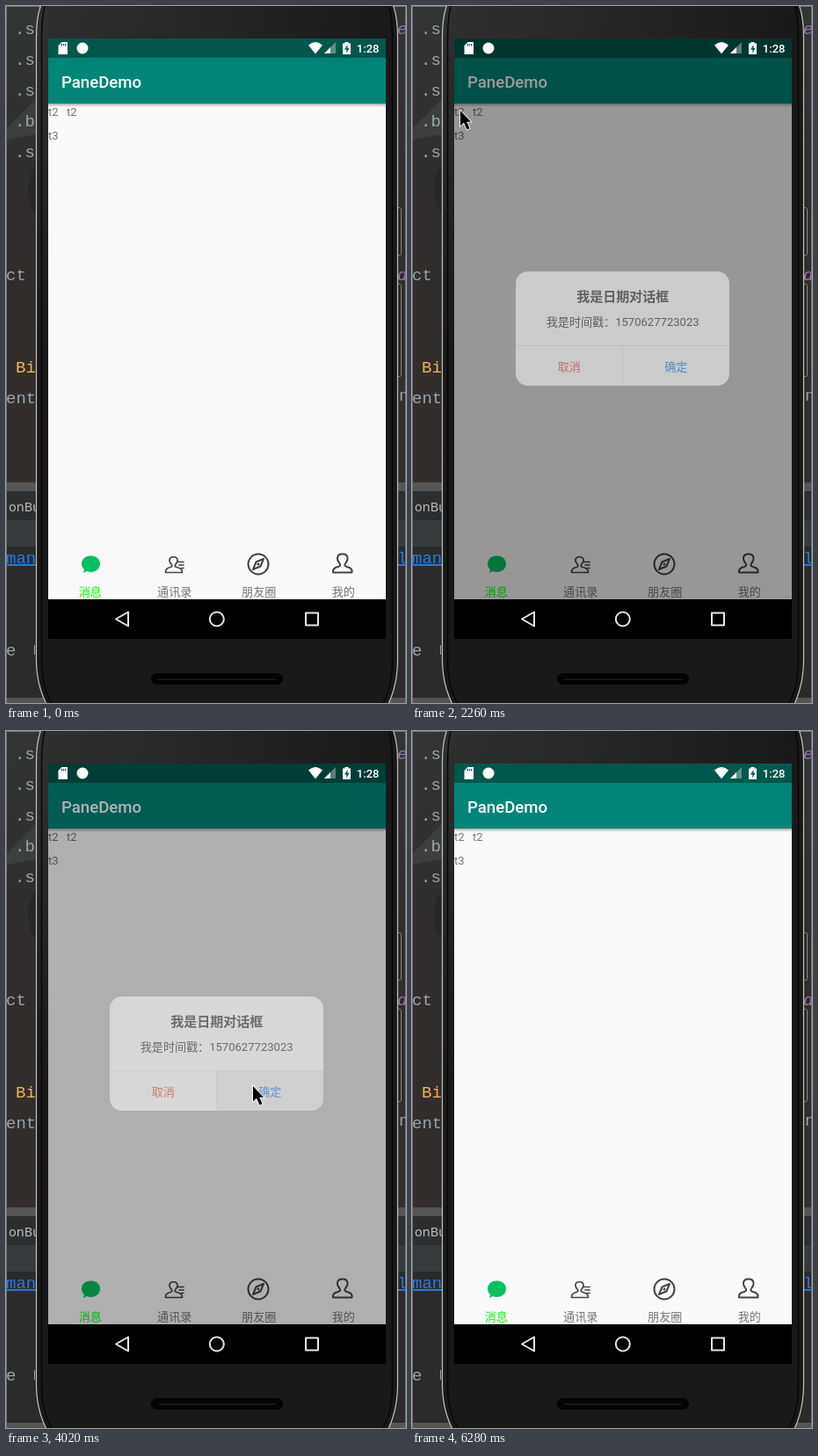
Write an HTML page that moves like this. It is 455 by 793 pixels and loops after 6.43 s.

```html
<!DOCTYPE html>
<html lang="zh-CN">
<head>
<meta charset="utf-8">
<style>
  html, body { margin: 0; width: 100%; height: 100%; overflow: hidden; background: #2b2b2b; }
  svg { display: block; width: 455px; height: 793px; font: 13.07px Roboto, "Noto Sans CJK SC", "Noto Sans CJK", sans-serif; }
  .code { font: 19px "Liberation Mono", monospace; fill: #98a5ae; }
  .link { fill: #287bde; text-decoration: underline; }
  .field { font-style: italic; fill: #9876aa; }
  .hint { font: 14.5px "Noto Sans", sans-serif; fill: #bbb; }
  .mid { text-anchor: middle; }
  .line { fill: none; stroke: #444; stroke-width: 2; stroke-linejoin: round; stroke-linecap: round; }
</style>
</head>
<body>
<svg viewBox="0 0 455 793">
  <defs>
    <linearGradient id="wall" x2="0" y2="1">
      <stop offset="0" stop-color="#333434"/>
      <stop offset=".3" stop-color="#303030"/>
      <stop offset=".42" stop-color="#302d2c"/>
      <stop offset="1" stop-color="#332e2c"/>
    </linearGradient>
    <radialGradient id="gloss" gradientUnits="userSpaceOnUse" cx="40" cy="0" r="400">
      <stop offset="0" stop-color="#303030"/>
      <stop offset="1" stop-color="#191919"/>
    </radialGradient>
    <linearGradient id="shadow" x2="0" y2="1">
      <stop offset="0" stop-opacity=".32"/>
      <stop offset="1" stop-opacity="0"/>
    </linearGradient>
    <clipPath id="card"><rect x="118" y="302" width="243" height="130" rx="14"/></clipPath>
  </defs>

  <!-- Editor behind the phone -->
  <rect width="455" height="542" fill="url(#wall)"/>
  <path d="M0 140L34 106V146L0 152Z" fill="#3d3f3f"/>
  <path d="M34 180Q24 195 25 212T34 235Z" fill="#272727"/>
  <rect y="542" width="455" height="10" fill="#555"/>
  <rect y="552" width="455" height="33" fill="#2d2e2f"/>
  <rect y="585" width="455" height="30" fill="#363b3e"/>
  <rect y="615" width="455" height="172" fill="#2b2b2b"/>
  <rect y="787" width="455" height="6" fill="#555"/>
  <path d="M.5 793V.5H454.500V793" fill="none" stroke="#77797a"/>
  <g class="code">
    <text x="10" y="32">.s</text>
    <text x="10" y="67">.s</text>
    <text x="10" y="102">.s</text>
    <text x="10" y="137">.b</text>
    <text x="10" y="172">.s</text>
    <text x="0" y="312">ct</text>
    <text x="11" y="417" style="fill:#f0b455">Bi</text>
    <text x="0" y="452">ent</text>
    <text x="0" y="634" class="link">man</text>
    <text x="0" y="739">e</text>
    <text x="445" y="32" class="field">e</text>
    <text x="445" y="312" class="field">d</text>
    <text x="447" y="449">n</text>
    <text x="445" y="634" class="link">l</text>
  </g>
  <text x="3" y="575" class="hint">onBu</text>
  <path d="M32.500 727V738" stroke="#98a5ae"/>

  <!-- Phone body -->
  <g fill="#262626" stroke="#8b8b8b">
    <rect x="444.500" y="229.500" width="5" height="54" rx="2"/>
    <rect x="444.500" y="316.500" width="5" height="105" rx="2"/>
  </g>
  <path d="M40 -2Q34.500 12 34.500 36V745Q35 774 47 796H434Q445 774 445.500 745V36Q445.500 12 440 -2Z" fill="url(#gloss)" stroke="#c4c4c4" stroke-width="1.200"/>
  <path d="M44 0Q40.500 14 40.500 40V745Q41 776 52 793M429 793Q439 776 439.500 745V40Q439.500 14 436 0" fill="none" stroke="#080808" stroke-width="1.500"/>
  <rect x="165" y="759" width="150" height="13" rx="6.500" fill="#030303"/>
  <path d="M174 766H306" stroke="#151515" stroke-width="2" stroke-linecap="round"/>

  <!-- App -->
  <rect x="48" y="37" width="384" height="22" fill="#00574b"/>
  <rect x="48" y="59" width="384" height="52" fill="#008577"/>
  <rect x="48" y="111" width="384" height="564" fill="#fafafa"/>
  <rect x="48" y="111" width="384" height="4" fill="url(#shadow)"/>
  <text x="63" y="92.500" font-size="18.600" font-weight="500" fill="#fff">PaneDemo</text>
  <g fill="#757575">
    <text x="48" y="125">t2</text>
    <text x="69" y="125">t2</text>
    <text x="48" y="152">t3</text>
    <g class="mid">
      <text x="95.700" y="671" fill="#0f0">消息</text>
      <text x="191.700" y="671">通讯录</text>
      <text x="287.700" y="671">朋友圈</text>
      <text x="383.700" y="671">我的</text>
    </g>
  </g>
  <path d="M96.500 625.500C103 625.500 107 629.500 107 634.500S103 644 96.500 644Q94 644 92 643L88 645 89 641Q86 638.500 86 634.500C86 629.500 90 625.500 96.500 625.500Z" fill="#05c160"/>
  <g class="line">
    <path stroke-width="1.700" d="M181.500 644.500Q181 640 187 638.500C189.500 638 189 636.500 188 635Q185.500 632 186 630.500C186 625.500 195 625.500 195 630.500Q195.500 632 193 635C192 636.500 191.500 638 194 638.500Q201 640 200.500 644.500ZM196 632.500H202M197 636H202M199.500 639.500H202"/>
    <circle cx="287" cy="635" r="11.500"/>
    <path d="M293 629L289.500 637.500 281 641 284.500 632.500Z"/>
    <path d="M372 644.500Q371 639.500 378 638C381 637 380.500 635.500 379 633.500Q376.500 630.500 377 628C377.500 622 388 622 388.500 628Q389 630.500 386.500 633.500C385 635.500 384.500 637 387.500 638Q394.500 639.500 393.500 644.500Z"/>
  </g>
  <circle cx="287" cy="635" r="1.500" fill="#444"/>

  <rect id="dim" x="48" y="37" width="384" height="638"/>

  <!-- System bars -->
  <g fill="#fff">
    <path d="M63.500 41H70V55H59.500V45Z"/>
    <circle cx="87" cy="48" r="6.500"/>
    <path d="M344 44.500Q352 37.500 360 44.500L352 54.500Z"/>
    <path d="M375 41V54H362Z" opacity=".35"/>
    <path d="M369 47V54H362Z"/>
    <path d="M385.500 41H389.500V42.500H392V55H383V42.500H385.500Z"/>
    <text x="424.500" y="53" text-anchor="end" font-weight="500">1:28</text>
  </g>
  <path d="M63.500 43V45.500M65.500 43V45.500M67.500 43V45.500" stroke="#00574b"/>
  <path d="M388.500 44L385 49.500H387.300V53.500L390.500 48H388.500Z" fill="#00574b"/>
  <rect x="48" y="675" width="384" height="45"/>
  <g class="line" style="stroke:#e6e6e6">
    <path d="M125 697.500L139 689.500V705.500Z"/>
    <circle cx="239.800" cy="697.500" r="8"/>
    <rect x="341" y="690.500" width="14" height="14"/>
  </g>

  <g id="dialog" class="mid" fill="#2b2b2b">
    <g clip-path="url(#card)">
      <rect x="118" y="302" width="243" height="130" fill="#fff"/>
      <rect id="press" x="239" y="387" width="122" height="45" fill="#f0f0f0"/>
      <path d="M118 386.500H361M239.500 387V432" stroke="#e3e3e3"/>
    </g>
    <text x="239.700" y="336" font-size="15" font-weight="700">我是日期对话框</text>
    <text x="239.700" y="364">我是时间戳：1570627723023</text>
    <text x="178.700" y="415" fill="#f0433a">取消</text>
    <text x="300.200" y="415" fill="#1b7cf2">确定</text>
  </g>

  <g id="toast" class="mid">
    <rect x="201.500" y="574" width="77" height="41" rx="20.500" fill="#a0a0a0"/>
    <text x="239.800" y="600" font-size="14.900" fill="#fff">成功</text>
  </g>

  <g id="cursor">
    <path d="M1 1V18.500L5 14.800 8.500 22.500 11.500 21.200 8.200 13.800H13Z" stroke="#fff" stroke-width="1.600" paint-order="stroke"/>
  </g>
</svg>
<script>
  const LOOP = 6430, TICK = LOOP / 48, LEAD = 34; // the picture changes in 48 even ticks
  const el = id => document.getElementById(id);
  const dim = el('dim'), dialog = el('dialog'), press = el('press');
  const toast = el('toast'), cursor = el('cursor');

  const ramp = (n, from, to) => Math.min(1, Math.max(0, (n - from) / (to - from)));

  // Pointer gestures; power below 1 eases out, above 1 eases in.
  const home = { x: 329, y: 368 };
  const gestures = [
    { from: 2, to: 4, x: 243, y: 451, power: 1 },
    { from: 4, to: 5, x: 198, y: 382, power: 1 },
    { from: 5, to: 8, x: 83, y: 170, power: .55 },
    { from: 8, to: 12, x: 54, y: 118, power: .5 },
    { from: 20, to: 23, x: 394, y: 387, power: 2 },
    { from: 24, to: 27, x: 280, y: 403, power: 2 },
    { from: 30, to: 33, x: 256, y: 418, power: 1 },
    { from: 34, to: 37, x: 295, y: 530, power: 2 },
    { from: 37, to: 39, x: 312, y: 692, power: 1 },
    { from: 39, to: 41, x: 145, y: 643, power: 1 }
  ];

  function pointerAt(n) {
    let { x, y } = home;
    for (const g of gestures) {
      const p = ramp(n, g.from, g.to) ** g.power;
      x += (g.x - x) * p;
      y += (g.y - y) * p;
    }
    return { x, y };
  }

  function draw(time) {
    const n = Math.floor((time % LOOP + LEAD) / TICK);
    const closing = 1 - ramp(n, 29, 31);
    dim.style.opacity = .6 * ramp(n, 14, 18) ** 1.45 * closing;
    dialog.style.opacity = ramp(n, 16, 18) * closing;
    press.style.opacity = n >= 28 ? 1 : 0;
    toast.style.opacity = n > 30 ? 1 - ramp(n, 44, 47) : 0;

    const { x, y } = pointerAt(n);
    cursor.setAttribute('transform', `translate(${Math.round(x)} ${Math.round(y)})`);
    cursor.style.opacity = n >= 2 && n < 42 ? 1 : 0;
  }

  const start = performance.now();
  (function tick() {
    draw(performance.now() - start);
    requestAnimationFrame(tick);
  })();
</script>
</body>
</html>
```
